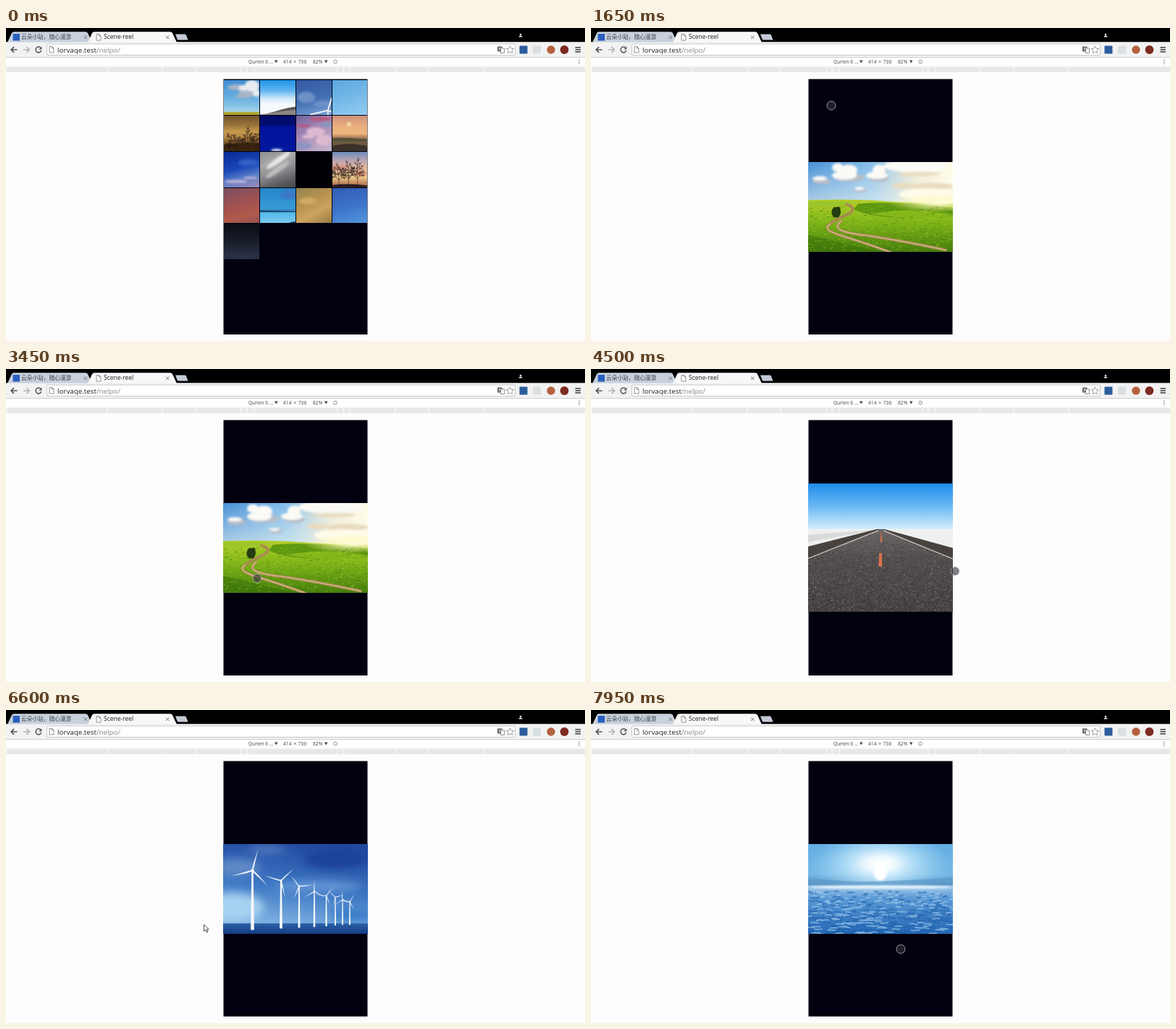
Recreate the animation shown at these times as an HTML page. Size 800 px wide and 432 px high, loop 8000 ms.

```html
<!DOCTYPE html>
<html lang="en">
<head>
<meta charset="utf-8">
<title>Scene-reel</title>
<style>
  html, body { margin: 0; width: 100%; height: 100%; overflow: hidden; background: #fdfdfd; }
  #stage { position: relative; width: 800px; height: 432px; overflow: hidden; background: #fdfdfd; }
  #stage > svg { position: absolute; left: 0; top: 0; }
  text { font-family: "Open Sans", "Noto Sans", sans-serif; }
  .zh { font-family: "Noto Sans CJK SC", "Noto Sans CJK", sans-serif; }
  .small { font-size: 6.7px; fill: #444; }

  #phone { position: absolute; left: 300px; top: 70px; width: 200px; height: 353px; overflow: hidden;
    background: #01000f; clip-path: inset(.5px .5px 0 .5px); }
  #grid { position: absolute; left: 1px; top: 1.5px; display: grid;
    grid-template-columns: repeat(4, 48.8px); grid-auto-rows: 48.7px; gap: 1px 1.1px; }
  #grid > div { overflow: hidden; }
  #grid svg { display: block; width: 100%; height: 100%; }
  #view, #strip { position: absolute; inset: 0; }
  .photo { position: absolute; width: 200px; }

  #grid, #view, #strip, #cursor, #disc, #arrow { animation: 8s step-end infinite; }
  #grid { animation-name: grid; }
  #view { animation-name: open; }
  #strip { animation-name: slide; }
  #cursor { animation-name: move; }
  #disc { animation-name: disc; }
  #arrow { animation-name: arrow; }

  @keyframes grid {
    0% { opacity: 1; }
    16.875% { opacity: .6; }
    18.75% { opacity: .25; }
    20.625%, 100% { opacity: 0; }
  }
  @keyframes open {
    0% { opacity: 0; transform: scale(.3); }
    16.875% { opacity: .35; transform: scale(.45); }
    18.75% { opacity: .7; transform: scale(.8); }
    20.625%, 100% { opacity: 1; transform: none; }
  }
  @keyframes slide {
    0% { transform: translateX(0); }
    45% { transform: translateX(-70px); }
    46.875% { transform: translateX(-160px); }
    48.75% { transform: translateX(-200px); }
    65.625% { transform: translateX(-270px); }
    67.5% { transform: translateX(-360px); }
    69.375% { transform: translateX(-400px); }
    91.875% { transform: translateX(-470px); }
    93.75% { transform: translateX(-560px); }
    95.625%, 100% { transform: translateX(-600px); }
  }
  /* one step every 150 ms */
  @keyframes move {
    0% { transform: translate(332px, 107px); }
    22.5% { transform: translate(332px, 107px); animation-timing-function: steps(3); }
    28.125% { transform: translate(483px, 280px); }
    35.625% { transform: translate(483px, 280px); animation-timing-function: steps(3); }
    41.25% { transform: translate(347px, 289px); }
    45% { transform: translate(347px, 289px); animation-timing-function: steps(5); }
    54.375% { transform: translate(503px, 279px); }
    58.125% { transform: translate(503px, 279px); animation-timing-function: steps(2); }
    61.875% { transform: translate(350px, 286px); }
    67.5% { transform: translate(350px, 286px); animation-timing-function: steps(6); }
    78.75% { transform: translate(273px, 296px); }
    84.375% { transform: translate(273px, 296px); animation-timing-function: steps(2); }
    88.125% { transform: translate(470px, 300px); animation-timing-function: steps(2); }
    91.875% { transform: translate(345px, 305px); animation-timing-function: steps(4); }
    99.375%, 100% { transform: translate(428px, 330px); }
  }
  @keyframes disc {
    0% { opacity: 0; }
    3.75% { opacity: 1; }
    75% { opacity: 0; }
    86.25%, 100% { opacity: 1; }
  }
  @keyframes arrow {
    0% { opacity: 0; }
    75% { opacity: 1; }
    86.25%, 100% { opacity: 0; }
  }
</style>
</head>
<body>
<div id="stage">
  <!-- browser frame -->
  <svg width="800" height="432">
    <rect width="800" height="19.5"/>
    <path d="M2 20L8 7Q9 5.300 11 5.300H110Q112 5.300 113 7L119 20Z" fill="#c8d1dc"/>
    <path d="M113 20L119 7Q120 5.300 122 5.300H227Q229 5.300 230 7L236 20Z" fill="#f8f8f8"/>
    <path d="M234 8.500H247Q248.500 8.500 249 10L251.500 16.500H238.500Q237 16.500 236.500 15Z" fill="#c3cad6"/>
    <rect x="9.500" y="8" width="9.500" height="9.500" fill="#2a5fc0"/>
    <text class="zh" x="21" y="15.200" font-size="7.700" fill="#3b424c" lang="zh-CN">云朵小站，随心漫游</text>
    <text x="135" y="15.200" font-size="8.500" fill="#222">Scene-reel</text>
    <g fill="none" stroke="#777" stroke-width="1">
      <path d="M107.500 10.500l4.500 4.500m0-4.500l-4.500 4.500M221 10.500l4.500 4.500m0-4.500l-4.500 4.500"/>
      <path id="page" d="M125 8.500h3.500l2.500 2.500v6h-6zM128.500 8.500v2.500h2.500" fill="#fff" stroke-width=".8"/>
    </g>
    <g fill="#eee"><circle cx="711" cy="9" r="1.300"/><path d="M708.500 12.500q0-2 2.500-2t2.500 2z"/></g>

    <rect y="19.500" width="800" height="21" fill="#f2f2f2"/>
    <path d="M0 40.500H800" stroke="#cfcfcf"/>
    <rect x="56.500" y="22" width="647" height="15.500" rx="1.500" fill="#fff" stroke="#bcbcbc" stroke-width=".8"/>
    <use href="#page" x="-65" y="17" fill="none" stroke="#777"/>
    <text x="71" y="33.500" font-size="9.800" fill="#222">lorvaqe.test<tspan fill="#888">/nelpo/</tspan></text>
    <g fill="none" stroke="#555" stroke-width="1.700">
      <path d="M15.500 30H7.500M11 26.200L7.200 30l3.800 3.800"/>
      <path d="M24 30h8M28.500 26.200l3.800 3.800l-3.800 3.800" stroke="#b5b5b5"/>
      <path d="M47.800 27.300A3.900 3.900 0 1 0 48.700 31" stroke-width="1.500"/>
      <path d="M786.500 26.800h7.500m-7.500 3h7.500m-7.500 3h7.500"/>
    </g>
    <path d="M49.300 25.500v4h-4z" fill="#555"/>
    <rect x="679" y="25.500" width="6.500" height="7" fill="#666"/>
    <rect x="683.500" y="28" width="5" height="6.500" fill="#fff" stroke="#777" stroke-width=".8"/>
    <path d="M680.500 28h3.500m-1.800-1v2q0 1.500-1.700 2" stroke="#fff" stroke-width=".7" fill="none"/>
    <path d="M696.500 24.800l1.500 3.400 3.700.4-2.800 2.500.8 3.700-3.200-1.900-3.200 1.900.8-3.700-2.800-2.500 3.700-.4z" fill="#fff" stroke="#888" stroke-width=".8"/>
    <rect x="709.500" y="24.500" width="11" height="11" rx="1" fill="#2d5c9e"/>
    <rect x="728" y="24.500" width="11" height="11" rx="1" fill="#d9dfe2"/>
    <circle cx="753" cy="30" r="5.700" fill="#b5613f"/>
    <circle cx="771.500" cy="30" r="5.900" fill="#7d2a20"/>

    <rect y="41" width="800" height="12" fill="#fff"/>
    <g class="small">
      <text x="335" y="49">Qurlen 6 ...</text>
      <text x="383" y="49" word-spacing="1">414 × 736</text>
      <text x="424" y="49">82%</text>
      <path d="M371 44.500h4.500l-2.250 4zM440 44.500h4.500l-2.250 4z"/>
    </g>
    <circle cx="455" cy="46.500" r="2.400" fill="none" stroke="#888" stroke-width=".9"/>
    <path d="M792 43.500v6.500" stroke="#777" stroke-width="1.300" stroke-dasharray="1.300"/>
    <path d="M0 53H800" stroke="#e6e6e6" stroke-width=".7"/>
    <rect x="1" y="54" width="799" height="7" fill="#e7e7e8"/>
    <path id="ruler" stroke="#fdfdfd"/>
  </svg>

  <div id="phone">
    <div id="grid"></div>
    <div id="view"><div id="strip">
      <!-- meadow -->
      <svg class="photo" style="left:0;top:114.500px" height="124" viewBox="300 184.500 200 124">
        <defs>
          <linearGradient id="sky1"><stop stop-color="#468fd6"/><stop offset=".45" stop-color="#86bfe9"/><stop offset=".75" stop-color="#eee9cf"/><stop offset="1" stop-color="#fffbe4"/></linearGradient>
          <linearGradient id="haze" x2="0" y2="1"><stop stop-color="#fff" stop-opacity="0"/><stop offset="1" stop-color="#f2f7ec" stop-opacity=".65"/></linearGradient>
          <linearGradient id="grass" x2="0" y2="1"><stop stop-color="#b4ce2c"/><stop offset=".4" stop-color="#83b81a"/><stop offset="1" stop-color="#447d0c"/></linearGradient>
          <radialGradient id="sun1"><stop stop-color="#fffde0"/><stop offset="1" stop-color="#fff68a" stop-opacity="0"/></radialGradient>
          <filter id="soft" x="-50%" y="-50%" width="200%" height="200%"><feGaussianBlur stdDeviation="1.500"/></filter>
          <filter id="blur" x="-50%" y="-50%" width="200%" height="200%"><feGaussianBlur stdDeviation="6"/></filter>
        </defs>
        <rect x="300" y="184" width="200" height="62" fill="url(#sky1)"/>
        <rect x="300" y="184" width="200" height="62" fill="url(#haze)"/>
        <g filter="url(#soft)">
          <g fill="#b6bdc8"><ellipse cx="357" cy="206" rx="21" ry="6"/><ellipse cx="319" cy="211" rx="13" ry="4"/><ellipse cx="372" cy="223" rx="10" ry="3"/><ellipse cx="398" cy="207" rx="14" ry="5"/></g>
          <g fill="#fbfaf5"><ellipse cx="350" cy="203" rx="17" ry="6"/><ellipse cx="356" cy="196" rx="12" ry="8"/><ellipse cx="341" cy="192" rx="8" ry="6"/><ellipse cx="395" cy="203" rx="15" ry="5"/><ellipse cx="398" cy="196" rx="9" ry="8"/><ellipse cx="316" cy="207" rx="10" ry="3"/><ellipse cx="450" cy="190" rx="46" ry="9"/><ellipse cx="371" cy="221" rx="7" ry="2"/></g>
          <g fill="#e8dcc0"><ellipse cx="453" cy="201" rx="29" ry="3"/><ellipse cx="430" cy="217" rx="15" ry="4"/><ellipse cx="471" cy="218" rx="30" ry="5"/></g>
          <ellipse cx="468" cy="229" rx="43" ry="8" fill="#fffbea"/>
        </g>
        <path d="M300 237Q360 235 400 238T500 242V309H300Z" fill="url(#grass)"/>
        <path d="M300 239Q340 237 367 240Q350 245 300 247Z" fill="#9cc62a"/>
        <path d="M369 242Q420 238 500 247V260Q440 264 395 259Q373 255 363 250Z" fill="#5f9910"/>
        <path d="M386 256Q440 246 500 257V261Q430 264 386 256Z" fill="#84b81a"/>
        <ellipse cx="480" cy="241" rx="70" ry="13" fill="url(#sun1)"/>
        <path d="M300 285Q340 294 400 309H300Z" fill="#397408" opacity=".55"/>
        <path id="blades" stroke="#c1d83c" stroke-width=".7" opacity=".55"/>
        <path id="shade" stroke="#2d6508" stroke-width=".8" opacity=".5"/>
        <g fill="none" stroke-linecap="round">
          <path id="track" d="M353 243Q369 248 356 256Q338 264 330 270C319 278 336 283 352 288Q378 296 414 309M346 266C331 277 350 282 374 285Q425 292 490 306" stroke="#a98a52" stroke-width="3.800"/>
          <path d="M330 270C319 278 336 283 352 288Q378 296 414 309M346 266C331 277 350 282 374 285Q425 292 490 306" stroke="#cfb486" stroke-width="1.700"/>
        </g>
        <path d="M336 261Q331 256 333 251Q335 245 339 247Q344 244 344.500 250Q346 256 342 261Z" fill="#253c10"/>
      </svg>

      <!-- road -->
      <svg class="photo" style="left:200px;top:88px" height="177" viewBox="300 158 200 177">
        <defs>
          <linearGradient id="sky2" x2="0" y2="1"><stop stop-color="#1f8be9"/><stop offset=".5" stop-color="#6bb9f5"/><stop offset="1" stop-color="#d8f0fd"/></linearGradient>
          <linearGradient id="tar" x2="0" y2="1"><stop stop-color="#6c6767"/><stop offset=".35" stop-color="#544f4f"/><stop offset="1" stop-color="#464141"/></linearGradient>
        </defs>
        <rect x="300" y="158" width="200" height="64" fill="url(#sky2)"/>
        <rect x="300" y="221" width="200" height="114" fill="#eef0f0"/>
        <path d="M300 229L392 222L300 239Z" fill="#d8dad8"/>
        <path d="M395 221L300 245V264L400 223L500 264V247L405 221Z" fill="#49433f"/>
        <path d="M399 221L300 260V335H500V261L402 221Z" fill="url(#tar)"/>
        <path id="grit" stroke="#989191" stroke-width=".8" opacity=".65"/>
        <path id="pits" stroke="#231f1f" stroke-width=".8" opacity=".65"/>
        <path d="M397 223L300 261.500M404 223L500 262" stroke="#d9d7d5" stroke-width="1.100"/>
        <path d="M400.300 226h1l1 13h-2.400zM398.300 254h3.500l.5 18.500h-5z" fill="#dc7050"/>
      </svg>

      <!-- turbines -->
      <svg class="photo" style="left:400px;top:114.500px" height="124" viewBox="300 184.500 200 124">
        <defs>
          <linearGradient id="sky3" x1=".6" x2=".4" y2="1"><stop stop-color="#2149a0"/><stop offset=".5" stop-color="#3e78c4"/><stop offset="1" stop-color="#8dbfe8"/></linearGradient>
          <linearGradient id="sea" x2="0" y2="1"><stop stop-color="#2b61a9"/><stop offset="1" stop-color="#123b80"/></linearGradient>
        </defs>
        <rect x="300" y="184" width="200" height="125" fill="url(#sky3)"/>
        <g filter="url(#blur)">
          <ellipse cx="312" cy="272" rx="44" ry="20" fill="#a7d1f0"/>
          <ellipse cx="318" cy="217" rx="34" ry="12" fill="#6089c6"/>
          <ellipse cx="360" cy="192" rx="26" ry="6" fill="#5379bd"/>
          <ellipse cx="455" cy="205" rx="45" ry="14" fill="#1d4399"/>
          <ellipse cx="430" cy="243" rx="60" ry="7" fill="#6899d6"/>
          <ellipse cx="478" cy="282" rx="30" ry="9" fill="#3b7ecb"/>
        </g>
        <rect x="300" y="294" width="200" height="15" fill="url(#sea)"/>
        <g id="mills" fill="#f5f8fb"></g>
      </svg>

      <!-- sea of clouds -->
      <svg class="photo" style="left:600px;top:114.500px" height="124" viewBox="300 184.500 200 124">
        <defs>
          <linearGradient id="sky4" x2="0" y2="1"><stop stop-color="#62aee4"/><stop offset=".7" stop-color="#77b9e5"/><stop offset="1" stop-color="#4c8cbe"/></linearGradient>
          <radialGradient id="sun4"><stop stop-color="#fff"/><stop offset=".2" stop-color="#f0faff"/><stop offset=".5" stop-color="#c8ebfc" stop-opacity=".7"/><stop offset="1" stop-color="#a8dcf8" stop-opacity="0"/></radialGradient>
          <linearGradient id="fluff" x2="0" y2="1"><stop stop-color="#a6cdec"/><stop offset=".25" stop-color="#5b9ad6"/><stop offset="1" stop-color="#2367b5"/></linearGradient>
          <filter id="mist"><feGaussianBlur stdDeviation=".7"/></filter>
        </defs>
        <rect x="300" y="184" width="200" height="60" fill="url(#sky4)"/>
        <ellipse cx="400" cy="212" rx="95" ry="48" fill="url(#sun4)"/>
        <path d="M300 231Q350 238 400 236T500 231V243H300Z" fill="#5f9bca" opacity=".7"/>
        <ellipse cx="400" cy="224" rx="9" ry="11" fill="#fff" filter="url(#soft)"/>
        <rect x="300" y="242" width="200" height="67" fill="url(#fluff)"/>
        <ellipse cx="400" cy="244" rx="98" ry="2.300" fill="#eaf6fd" filter="url(#soft)"/>
        <g fill="none" stroke-linecap="round" filter="url(#mist)"><path id="dips" stroke="#1d5ca8" stroke-width="2.200" opacity=".5"/><path id="puffs" stroke="#a9d3f2" stroke-width="1.700" opacity=".6"/></g>
      </svg>
    </div></div>
  </div>

  <svg width="800" height="432">
    <g id="cursor">
      <circle id="disc" r="6" fill="#32303c" fill-opacity=".62" stroke="#d0cccc" stroke-opacity=".7"/>
      <path id="arrow" d="M.5 0v9.500l2.200-2 1.600 3.500 1.600-.7-1.600-3.400h2.900z" fill="#fff" stroke="#222" stroke-width=".8"/>
    </g>
  </svg>
</div>
<script>
  const $ = id => document.getElementById(id);
  let seed = 7;
  const rnd = () => (seed = seed * 16807 % 2147483647) / 2147483647;

  // n small strokes, each drawn by a rule
  const strokes = (id, n, rule) =>
    $(id).setAttribute('d', Array.from({ length: n }, rule).join(''));
  const f = v => v.toFixed(1);

  strokes('ruler', 12, (_, i) =>
    `M${[140, 216, 262, 325, 333, 343, 458, 466, 475, 538, 584, 660][i]} 54v7`);

  const blade = () => `M${f(300 + rnd() * 200)} ${f(246 + rnd() * 62)}l${f(1 + rnd() * 3)} -.6`;
  strokes('blades', 260, blade);
  strokes('shade', 260, blade);

  const grain = () => {
    const y = 226 + 109 * Math.sqrt(rnd());
    const half = Math.min(100, (y - 221) * 2.4);
    return `M${f(400 + (rnd() * 2 - 1) * half)} ${f(y)}h${f(.6 + rnd())}`;
  };
  strokes('grit', 1300, grain);
  strokes('pits', 1300, grain);

  const puff = () => {
    const depth = rnd(), w = 3 + depth * 9;
    return `M${f(296 + rnd() * 204)} ${f(249 + depth * 60)}q${f(w * rnd())} ${f((rnd() - .7) * (1 + depth * 4))} ${f(w)} ${f(rnd() * 2 - 1)}`;
  };
  strokes('dips', 230, puff);
  strokes('puffs', 190, puff);

  // hub x, hub y, base y, blade angle, blade length
  const mills = [
    [340.500, 221, 303, 15, 30], [380, 235, 301, 47, 24], [405, 243, 300, 84, 19],
    [426, 250, 299, 0, 17], [442.500, 256, 298, 38, 15], [455, 258, 297, 75, 13],
    [465, 261, 296, -4, 13], [475, 264, 296, 34, 13]
  ];
  const mill = ([x, y, base, angle, len]) => {
    const w = len / 15;
    const arms = [0, 120, 240].map(a =>
      `<path transform="translate(${x} ${y}) rotate(${angle + a})" d="M${-w / 2} 0L${-w * .6} ${-len * .35}L0 ${-len}L${w / 2} 0Z"/>`);
    return `<path d="M${x - w * .6} ${y}h${w * 1.2}L${x + w * 1.2} ${base}h${-w * 2.4}Z"/>
      <circle cx="${x}" cy="${y}" r="${w}"/>${arms.join('')}`;
  };
  $('mills').innerHTML = mills.map(mill).join('');

  // bare tree as one path: a leader with side twigs
  const tree = (x, y, len, angle, depth) => {
    const x2 = x + Math.sin(angle) * len, y2 = y - Math.cos(angle) * len;
    let d = `M${f(x)} ${f(y)}L${f(x2)} ${f(y2)}`;
    if (depth) {
      d += tree(x2, y2, len * .85, angle + (rnd() - .5) * .3, depth - 1);
      for (const side of [-1, 1])
        d += tree(x2, y2, len * (.4 + rnd() * .3), angle + side * (.5 + rnd() * .4), depth - 1);
    }
    return d;
  };
  const wood = (d, w) => `<path d="${d}" fill="none" stroke="#1c1414" stroke-width="${w}"/>`;
  const shape = (d, fill) => `<path d="${d}" fill="${fill}"/>`;
  const puffs = (fill, ...list) => `<g fill="${fill}" filter="url(#soft)">${list.map(([x, y, rx, ry]) =>
    `<ellipse cx="${x}" cy="${y}" rx="${rx}" ry="${ry}"/>`).join('')}</g>`;

  // background gradient, then shapes in a 49 x 49 box
  const thumbs = [
    ['#3f8fd4, #6cb2e2 55%, #b5dcee',
      puffs('#a9b4c6', [17, 10, 12, 4], [31, 19, 11, 6], [22, 23, 7, 2]) + puffs('#e9ebee', [39, 8, 10, 8], [28, 11, 8, 4], [45, 18, 5, 5]) +
      shape('M0 44H49V49H0Z', '#b0a62e')],
    ['#1f93e6, #5fb5f0 30%, #d5ebf8 55%, #f5fafc 70%', shape('M0 47.500Q18 46 29 41Q40 38 49 37V49H0Z', '#8a8583') +
      shape('M10 46Q24 43 29 41Q40 38 49 37V41Q30 43 10 46Z', '#5b5456')],
    ['165deg, #3558a2, #4470b3 55%, #7ea7d8',
      puffs('#6d90c6', [14, 24, 12, 8], [36, 33, 12, 4]) +
      `<path d="M44 42L49 25M44 42L19 48M44 42L49 44M44 42V49" stroke="#f4f6f8" stroke-width="1.800"/>`],
    ['160deg, #5aa8e0, #74b9e8 50%, #93cdf0', ''],
    ['#76542c, #94703a 25%, #c79a4c 45%, #b98a45 60%, #5a3b1e 85%',
      shape('M0 41Q20 36 49 38V49H0Z', '#38240f') + wood(tree(34, 48, 9, -.1, 4) + tree(20, 49, 8, -.5, 4) + tree(44, 48, 8, .2, 4), .6)],
    ['#000b68, #000d74 28%, #01139b 30%, #02189f', puffs('#e9eefc', [23, 48, 8, 2])],
    ['150deg, #6f609e, #a78bb8 45%, #c7b8cf',
      puffs('#b9567f', [34, 5, 15, 3], [10, 14, 10, 2]) + puffs('#ddb9d0', [27, 22, 13, 6], [38, 34, 11, 8], [17, 29, 9, 3]) +
      puffs('#8a94bd', [8, 42, 13, 5], [42, 12, 8, 4])],
    ['#cb937d, #e9ae7c 30%, #eeb881 50%, #c58c66 58%, #7a6647 68%, #4b3b2c',
      puffs('#fff3c4', [23, 12, 2.5, 2.5]) + shape('M0 31Q20 30 49 33V36H0Z', '#55503a') + shape('M0 42Q26 36 49 43V49H0Z', '#3b3028')],
    ['165deg, #0b2b94, #1847b7 45%, #5d7fc9 70%, #a28bb5', puffs('#c5b8d8', [17, 41, 16, 2], [37, 36, 10, 1.5]) + puffs('#315ec4', [34, 15, 14, 5])],
    ['160deg, #8d8d90, #a9a9ab 30%, #8b8b8e 55%, #5c5c60 80%, #48484c',
      `<g transform="rotate(-35 24 20)">${puffs('#e6e6e6', [30, 14, 20, 4])}${puffs('#bdbdbf', [22, 24, 20, 4])}</g>`],
    ['#010006, #010006', ''],
    ['#6b8dbc, #b5a3b4 22%, #e6b79a 45%, #f0cc8c 70%, #a25b3f',
      puffs('#d98a78', [9, 22, 11, 3], [39, 30, 10, 3]) + shape('M0 46Q25 43 49 47V49H0Z', '#251a20') +
      wood(tree(9, 48, 9, 0, 4) + tree(22, 48, 10, .04, 4) + tree(35, 48, 11, -.02, 4), .55)],
    ['165deg, #7c5062, #a4524f 50%, #b15a4c 75%, #96534f', ''],
    ['#2387c9, #3a9ad6 60%, #2d7bb3 64%, #51b7ea 67%, #78caee',
      shape('M0 31L49 32V33.500H0Z', '#17466d') + puffs('#3b79c6', [39, 9, 11, 7]) + shape('M38 49L44 47L49 46V49Z', '#173f5d')],
    ['150deg, #94834e, #b7924f 40%, #cda45e 65%, #967943', puffs('#cfa862', [16, 18, 12, 5])],
    ['165deg, #315cb4, #3d75c9 55%, #5396df', ''],
    ['#0c0d13, #171b26 45%, #2b344b', '']
  ];
  $('grid').innerHTML = thumbs.map(([fill, shapes]) =>
    `<div style="background:linear-gradient(${fill})"><svg viewBox="0 0 49 49">${shapes}</svg></div>`).join('');
</script>
</body>
</html>
```
